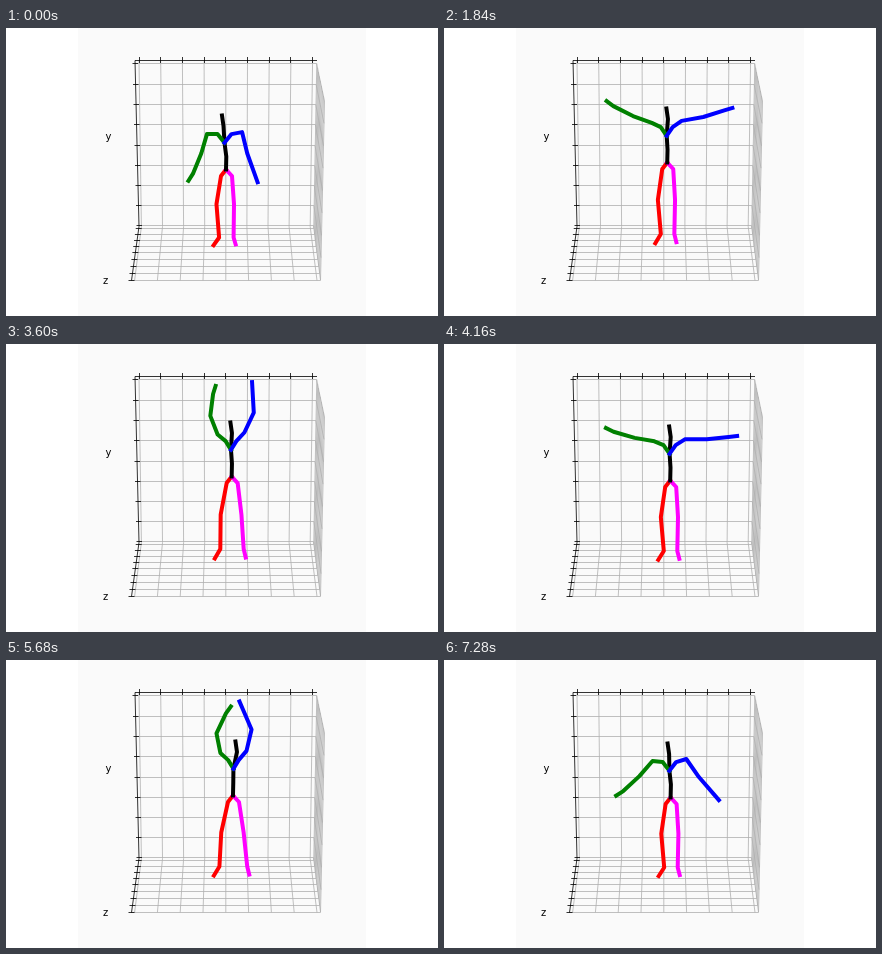
An HTML page that plays this animation: 432 by 288 pixels, repeating every 7.36 s.

```html
<!DOCTYPE html>
<html lang="en">
<head>
<meta charset="utf-8">
<title>Stick figure in a 3D plot</title>
<style>
html, body { margin: 0; width: 100%; height: 100%; overflow: hidden; background: #fff; }
svg { display: block; width: 100%; height: 100%; }
text { font: 10px "DejaVu Sans", sans-serif; text-anchor: middle; }
path { fill: none; }
#grid { stroke: #b0b0b0; stroke-width: .8; }
#axes { stroke: #000; stroke-width: .8; }
#body { stroke-width: 4; stroke-linecap: square; stroke-linejoin: round; }
</style>
</head>
<body>
<svg viewBox="0 0 432 288">
  <rect x="72" width="288" height="288" fill="#fafafa"/>
  <path id="grid"/>
  <path id="axes"/>
  <text x="102.5" y="112">y</text>
  <text x="99.5" y="256">z</text>
  <g id="body" transform="translate(0 .5)">
    <path id="legR" stroke="#f00"/>
    <path id="legL" stroke="#f0f"/>
    <path id="spine" stroke="#000"/>
    <path id="armR" stroke="#008000"/>
    <path id="armL" stroke="#00f"/>
  </g>
</svg>
<script>
const LOOP = 7360, STEP = 80;
const $ = id => document.getElementById(id);
const mix = (a, b, k) => a + (b - a) * k;
const seg = (x1, y1, x2, y2) => `M${x1} ${y1}L${x2} ${y2}`;
const crisp = v => Math.round(v) + .5;

// Room: back wall, floor and right wall, with ticks on three edges
function drawRoom() {
  let grid = '', axes = 'M129 32.5H311M129 32.5L133 198.5L125.5 252.5';
  for (let i = 0; i < 9; i++) {
    const k = i / 8, d = i - 4;
    const x = 219.8 + d * 21.7;
    const y = crisp(35 + i * 20.6 - i * i * .05);
    const floorY = crisp(200 + i * 5.6 + i * i * .11);
    const near = (floorY - 198.5) / 54;
    const left = 129 + 4 * k, right = 310.5 - 3 * k;
    const floorLeft = 133 - 7.5 * near;
    grid += `M${x} 32.5L${219.8 + d * 21.1} 198.5L${219.8 + d * 22.8} 252.5`;
    grid += seg(left, y, right, y) + seg(right, y, 318.5 - 4 * k, mix(73, 252, k));
    grid += seg(floorLeft, floorY, 307.5 + 7 * near, floorY);
    grid += seg(310.5 + 8 * near, 34 + 39 * near, 307.5 + 7 * near, floorY);
    axes += `M${crisp(x - .5)} 29V35M${left - 2.5} ${y}h5.5M${floorLeft - 3} ${floorY}h6`;
  }
  $('grid').setAttribute('d', grid);
  $('axes').setAttribute('d', axes);
}

// Turning points as [time, value]
const LIFT = [[0, 15], [800, 147], [1200, 170], [1840, 105], [2400, 82], [3040, 132], [3400, 170],
  [4160, 95], [4440, 86], [4800, 130], [5500, 169], [6400, 134], [7280, 38]];
const HEIGHT = [[0, 141], [280, 142.5], [1200, 133], [1840, 134], [2480, 138], [3040, 131],
  [3400, 131], [4160, 136], [4440, 138.5], [5680, 135], [7280, 137]];
const TILT = [[0, -4], [1200, -1], [4160, -1], [5680, 2.5], [7280, -3]];

// Smooth cubic through the points
function curve(points, t) {
  const last = points.length - 1;
  let i = 0;
  while (i < last - 1 && t >= points[i + 1][0]) i++;
  const a = points[i], b = points[i + 1];
  const p = points[Math.max(i - 1, 0)], n = points[Math.min(i + 2, last)];
  const span = b[0] - a[0], u = (t - a[0]) / span, d = b[1] - a[1];
  const m0 = (b[1] - p[1]) / (b[0] - p[0]) * span;
  const m1 = (n[1] - a[1]) / (n[0] - a[0]) * span;
  return a[1] + u * (m0 + u * (3 * d - 2 * m0 - m1 + u * (m0 + m1 - 2 * d)));
}

// Draws a limb from an origin through joints given relative to it
function trace(id, x, y, joints) {
  const points = joints.map(([dx, dy]) => `${(x + dx).toFixed(2)} ${(y + dy).toFixed(2)}`);
  $(id).setAttribute('d', 'M' + points.join('L'));
}

// side is -1 for the arm on the left of the picture, 1 for the other
function drawArm(id, side, x, y, lift, reach) {
  const rad = Math.PI / 180, raised = lift / 170;
  const upper = lift - side * 5 * Math.sin(lift * rad);
  const fore = upper + 6 + 30 * Math.max(0, (lift - 90) / 77) ** 2;
  const hand = fore + (side < 0 ? 10 : 0);
  const joints = [[0, 0]];
  const shoulder = [side * (18 - 5 * raised), -9 - 8 * raised - side];
  joints.push([shoulder[0] * .4, -8.7], shoulder);
  for (const [angle, length] of [[upper, 21 + side], [fore, 22], [hand, 8.5]]) {
    const [px, py] = joints[joints.length - 1];
    joints.push([px + side * reach * length * Math.sin(angle * rad), py + length * Math.cos(angle * rad)]);
  }
  trace(id, x, y, joints);
}

// Feet stay near the ground while the hips sink and rise
function drawLegs(x, y, stride) {
  const sink = y - 135;
  const knee = 37 - .4 * sink, ankle = 71 - .5 * sink, toe = 79.5 - .7 * sink;
  trace('legR', x, y, [[0, 0], [-5, 6.5], [-5.9 - .33 * stride, knee], [4.1 - stride, ankle], [-1.4 - stride, toe + .5]]);
  trace('legL', x, y, [[0, 0], [6, 6.5], [3.6 + .4 * stride, knee], [stride - 3.4, ankle], [stride - 1.4, toe - .5]]);
}

function frame(now) {
  const t = Math.floor(now % LOOP / STEP) * STEP;
  const lift = curve(LIFT, t), tilt = curve(TILT, t), y = curve(HEIGHT, t);
  const x = 220 + 7 * Math.sin(t / 6000 * Math.PI / 2);
  const stride = 10.5 + 7 * Math.max(0, (lift - 132) / 35);
  // The first raise goes towards the viewer, so the arms look narrow
  const reach = 1 - .85 * Math.sin(Math.PI * Math.min(t / 1100, 1));
  const chestX = x - .3 + tilt * .3, chestY = y - 26.7;
  drawLegs(x, y, t < 600 ? 11 : stride);
  trace('spine', x, y, [[tilt, -54], [tilt + 1.5, -43.5], [chestX - x, -26.7], [.3, -13], [0, 0]]);
  drawArm('armR', -1, chestX, chestY, lift, reach);
  drawArm('armL', 1, chestX, chestY, lift, reach);
  requestAnimationFrame(frame);
}

drawRoom();
frame(performance.now());
</script>
</body>
</html>
```
